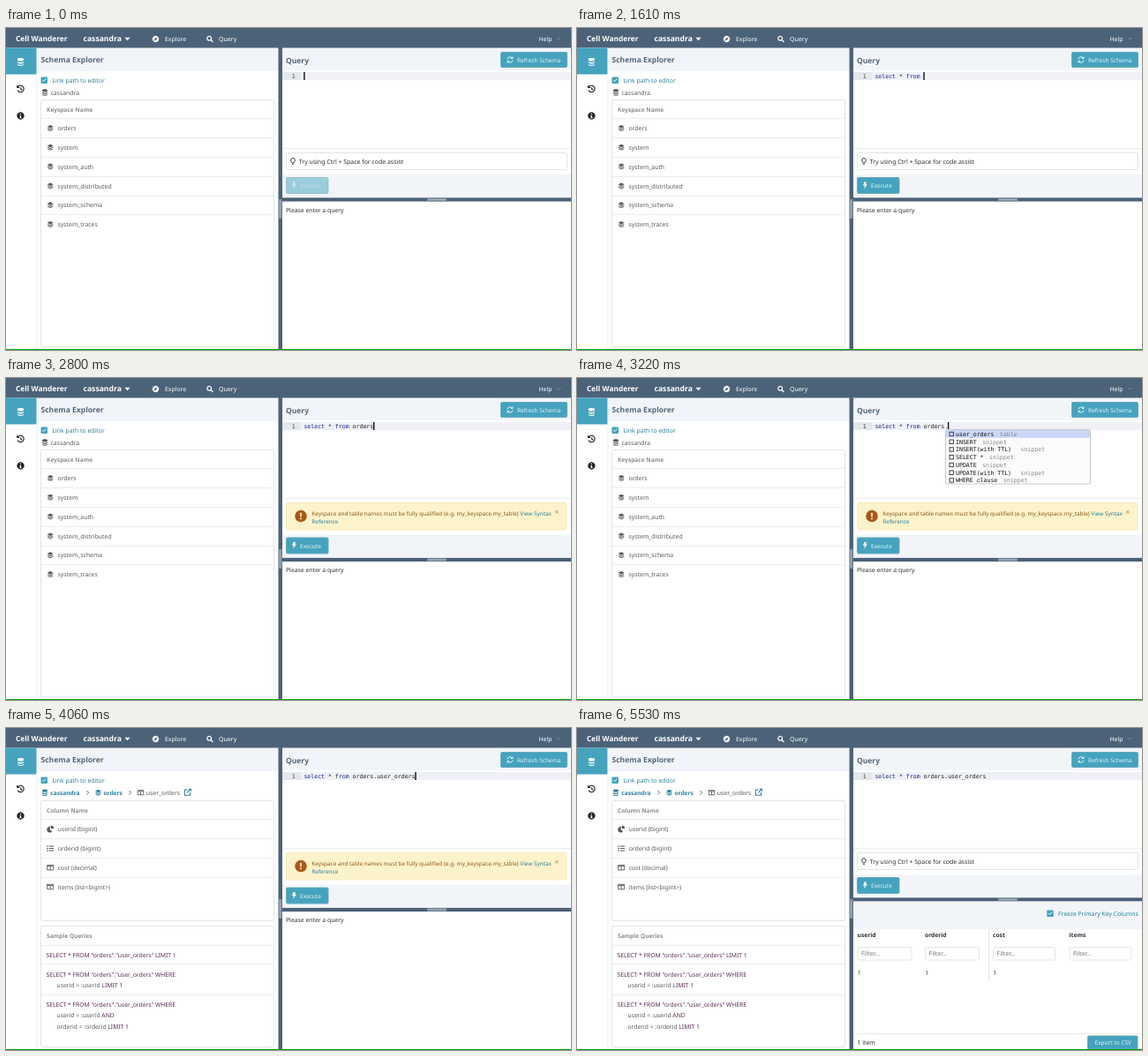
An HTML page with a canvas that plays this animation: 640x365 px, repeating every 5670 ms.

```html
<!DOCTYPE html>
<html lang="en">
<head>
<meta charset="utf-8">
<title>Schema browser</title>
<style>
html, body { margin: 0; width: 100%; height: 100%; overflow: hidden; background: #fff; }
canvas { display: block; }
</style>
</head>
<body>
<canvas id="stage" width="640" height="365"></canvas>
<script>
const ctx = document.getElementById('stage').getContext('2d');
const LOOP = 5670;
const SANS = '"Noto Sans", "Open Sans", sans-serif';
const MONO = '"DejaVu Sans Mono", monospace';
const SLATE = '#4c6278', TEAL = '#45a3be', LINK = '#2b809e', PALE = '#f1f5fa';
const INK = '#2e3136', GREY = '#56595d', MUTED = '#8a8d91', SQL = '#5a2a55', AMBER = '#8f5a18';
const RULE = '#ebedef', BORDER = '#e2e4e7', GRIP = '#8191a1', GRIP_LINE = '#a3b0bc';

const QUERY = 'select * from orders.user_orders';
const KEY_TIMES = [140, 210, 350, 420, 560, 630, 700, 980, 1190, 1330, 1400, 1470,
  1610, 1610, 1820, 1960, 2100, 2240, 2380, 2520, 3150];
const CHAR = 3.94, CODE_X = 337.4;

// Icons live in a 16 x 16 box.
const FILLED = {
  db: 'M2 3a6 2.4 0 0 1 12 0v1.4a6 2.4 0 0 1-12 0zM2 6.6a6 2.4 0 0 0 12 0v2.4a6 2.4 0 0 1-12 0zM2 11.2a6 2.4 0 0 0 12 0v2a6 2.4 0 0 1-12 0z',
  layers: 'M8 1l7 3.5-7 3.5-7-3.5zM1 8l2-1 5 2.5 5-2.5 2 1-7 3.5zM1 11.5l2-1 5 2.5 5-2.5 2 1-7 3.5z',
  info: 'M8 1a7 7 0 1 0 .01 0zM7 3.5h2v2h-2zM6 7h3v4h1v1.5h-4v-1.5h1v-2.5h-1z',
  compass: 'M8 1a7 7 0 1 0 .01 0zM12 4l-2.5 5.5-5.5 2.5 2.5-5.5z',
  alert: 'M8 0a8 8 0 1 0 .01 0zM7 3.5h2v5.5h-2zM7 10.5h2v2h-2z',
  caret: 'M1 4h14l-7 8z',
  bolt: 'M7 0h5l-2 5h4l-8 11 2-8h-4z',
  pie: 'M7 2v7l5 5a7 7 0 1 1-5-12zM9 0a7 7 0 0 1 7 7h-7z',
  list: 'M0 2h3v2.5h-3zM5 2h11v2h-11zM0 7h3v2.5h-3zM5 7h11v2h-11zM0 12h3v2.5h-3zM5 12h11v2h-11z'
};
const STROKED = {
  history: 'M3 4.5a6 6 0 1 1-.5 6M2 1.5v4h4M8.5 5v3.5l2.5 1.5',
  search: 'M6.5 2a4.5 4.5 0 1 0 .01 0zM10 10l4.5 4.5',
  down: 'M2 5l6 6 6-6',
  right: 'M5 2l6 6-6 6',
  refresh: 'M2 7a6 6 0 0 1 11-2.5M14 1v4h-4M14 9a6 6 0 0 1-11 2.5M2 15v-4h4',
  bulb: 'M6 11c0-2-2.5-3-2.5-5.5a4.5 4.5 0 0 1 9 0c0 2.5-2.5 3.5-2.5 5.5zM6.5 14h3',
  table: 'M1 2.5h14v11h-14zM1 5h14M8 5v8.5',
  external: 'M8 3h-6v11h11v-6M10 1.5h4.5v4.5M14 2l-7 7',
  check: 'M3.5 8l3 3 6-6.5',
  close: 'M3 3l10 10M13 3l-10 10'
};

function rect(x, y, w, h, color) {
  ctx.fillStyle = color;
  ctx.fillRect(x, y, w, h);
}

function box(x, y, w, h, fill, border, radius = 1) {
  ctx.beginPath();
  ctx.roundRect(x, y, w, h, radius);
  ctx.fillStyle = fill;
  ctx.fill();
  if (border) { ctx.strokeStyle = border; ctx.lineWidth = 1; ctx.stroke(); }
}

// y is the middle of the capitals.
function text(str, x, y, color = GREY, size = 6.85, weight = 400, family = SANS) {
  ctx.font = `${weight} ${size}px ${family}`;
  ctx.fillStyle = color;
  ctx.fillText(str, x, y + size * 0.38);
}
const bold = (str, x, y, color, size = 6.6) => text(str, x, y, color, size, 600);
const code = (str, x, y, color) => text(str, x, y, color, 6.55, 400, MONO);

function icon(name, cx, cy, size, color, weight = 1.8) {
  ctx.save();
  ctx.translate(cx - size / 2, cy - size / 2);
  ctx.scale(size / 16, size / 16);
  if (FILLED[name]) {
    ctx.fillStyle = color;
    ctx.fill(new Path2D(FILLED[name]), 'evenodd');
  } else {
    ctx.strokeStyle = color;
    ctx.lineWidth = weight;
    ctx.stroke(new Path2D(STROKED[name]));
  }
  ctx.restore();
}

function checkbox(x, y) {
  box(x, y, 7.5, 7.5, TEAL);
  icon('check', x + 3.75, y + 3.75, 7, '#fff', 2.2);
}

function button(x, y, w, h, label, labelX, glyph, glyphX) {
  box(x + .5, y + .5, w - 1, h - 1, TEAL, '#66a9bb', 1.5);
  if (glyph) icon(glyph, glyphX, y + h / 2, 8, '#fff');
  text(label, labelX, y + h / 2 + .3, '#e6f3f7', 6.55);
}

function listBox(y, bottom, title, rules) {
  box(39.5, y + .5, 264, bottom - y, '#fff', BORDER);
  bold(title, 46, y + 11.2, MUTED);
  for (const ry of rules) rect(40, ry, 263, 1, RULE);
}

function drawFrame() {
  rect(0, 0, 640, 365, '#fff');
  rect(35, 22, 274, 27, PALE);
  rect(313, 22, 327, 26, PALE);
  rect(0, 0, 640, 22.5, SLATE);
  bold('Cell Wanderer', 11, 12, '#fff', 8.35);
  bold('cassandra', 87.5, 12, '#fff', 8.6);
  icon('caret', 137.5, 12.5, 7, '#fff');
  icon('compass', 169.5, 12.5, 8.5, '#fff');
  text('Explore', 180, 12, '#fff');
  icon('search', 231, 12.5, 8.5, '#fff', 2.4);
  text('Query', 241, 12, '#fff', 7);
  text('Help', 603.5, 12, '#fff');
  icon('down', 626.5, 12, 5, '#a9b7c4');

  rect(34.5, 53, 1, 311, RULE);
  rect(0, 22.5, 34.5, 30, TEAL);
  icon('db', 16.5, 38.5, 9.5, '#fff');
  icon('history', 16.5, 69, 10, '#222');
  icon('info', 16.5, 99.5, 9.5, '#222');

  bold('Schema Explorer', 39.5, 36, '#56687a', 8.55);
  checkbox(39.5, 55.5);
  text('Link path to editor', 52.5, 59.2, LINK);
}

function drawKeyspaces() {
  icon('db', 44, 73, 8, GREY);
  text('cassandra', 50.5, 73);
  const names = ['orders', 'system', 'system_auth', 'system_distributed', 'system_schema', 'system_traces'];
  listBox(81, 361, 'Keyspace Name', names.map((_, i) => Math.round(102.4 + i * 21.8)));
  names.forEach((name, i) => {
    const y = 113.5 + i * 21.8;
    icon('layers', 50.2, y, 8, GREY);
    text(name, 58.5, y);
  });
}

function drawTableDetails() {
  icon('db', 44, 73.2, 8, LINK);
  bold('cassandra', 50.3, 73.2, LINK);
  icon('right', 92.5, 73.2, 6, GREY, 2.4);
  icon('layers', 104.5, 73.2, 8, LINK);
  bold('orders', 110.5, 73.2, LINK);
  icon('right', 140.5, 73.2, 6, GREY, 2.4);
  icon('table', 152.5, 73.2, 7.5, GREY);
  text('user_orders', 158.8, 73.2);
  icon('external', 205.7, 72.8, 9, LINK);

  const columns = [['pie', 'userid (bigint)'], ['list', 'orderid (bigint)'],
    ['table', 'cost (decimal)'], ['table', 'items (list<bigint>)']];
  listBox(82, 218, 'Column Name', columns.map((_, i) => Math.round(103.4 + i * 21.8)));
  columns.forEach(([glyph, label], i) => {
    const y = 114.6 + i * 21.8;
    icon(glyph, 50.2, y, 8, GREY);
    text(label, 58.7, y);
  });

  listBox(224, 361, 'Sample Queries', [246, 267, 302]);
  const select = 'SELECT * FROM "orders"."user_orders" ';
  const sql = (str, x, y, color = SQL) => {
    text(str, x, y, color, 6.78);
    return x + ctx.measureText(str).width;
  };
  sql(select + 'LIMIT 1', 45.5, 257);
  sql(select + 'WHERE', 45.5, 279);
  sql('LIMIT 1', sql('userid = :userid ', 57.5, 291.5, GREY), 291.5);
  sql(select + 'WHERE', 45.5, 313);
  sql('AND', sql('userid = :userid ', 57.5, 325.5, GREY), 325.5);
  sql('LIMIT 1', sql('orderid = :orderid ', 57.5, 338, GREY), 338);
}

function drawEditor(t) {
  bold('Query', 317, 36.3, '#56687a', 8.5);
  button(560, 27, 76, 18, 'Refresh Schema', 579, 'refresh', 571);

  rect(313, 50, 21, 9, '#e4e7ec');
  rect(334, 50, 306, 9, '#eff1f6');
  code('1', 323.8, 54.4, '#444');
  const count = t >= 3710 ? QUERY.length : KEY_TIMES.filter(k => k <= t).length;
  const typed = QUERY.slice(0, count);
  const words = [[0, 6, '#20208c'], [7, 8, '#222'], [9, 13, '#20208c'], [14, 32, '#222']];
  for (const [from, to, color] of words) {
    code(typed.slice(from, to), CODE_X + from * CHAR, 54.4, color);
  }
  const cursorOff = t >= 3500 && t < 3710 || t >= 4340 && t < 4830 || t >= 5040;
  if (!cursorOff) rect(CODE_X + count * CHAR - .2, 50, 1.4, 9, '#111');
  rect(313, 136, 327, 1, RULE);
}

function drawRunBar(t, warning) {
  const shift = warning ? 11.5 : 0;
  rect(313, 166 + shift, 327, 27, PALE);
  if (warning) {
    box(317.5, 141.5, 317.5, 30.5, '#fdf3cb', '#f6ebc0', 1.5);
    icon('alert', 334, 156.5, 13.5, '#a8571a');
    const message = 'Keyspace and table names must be fully qualified (e.g. my_keyspace.my_table) ';
    text(message, 346.3, 153.5, AMBER, 6.4);
    text('View Syntax', 346.3 + ctx.measureText(message).width, 153.5, LINK, 6.4);
    text('Reference', 346.3, 162.3, LINK, 6.4);
    icon('close', 623.7, 151.8, 5.5, AMBER);
  } else {
    box(317.5, 141.5, 318, 19, '#fff', BORDER);
    icon('bulb', 325, 151.3, 8.5, '#333');
    text('Try using Ctrl + Space for code assist', 331.8, 151.2, INK, 6.93);
  }
  ctx.globalAlpha = .5 + .5 * Math.min(1, Math.max(0, (t - 140) / 280));
  button(317, 169 + shift, 48.5, 19, 'Execute', 333, 'bolt', 326);
  ctx.globalAlpha = 1;

  rect(313, 192.4 + shift, 327, 4.2, SLATE);
  rect(477, 192.8 + shift, 22, 3.4, GRIP);
  rect(478, 194 + shift, 20, 1, GRIP_LINE);
  return shift;
}

function drawCompletions() {
  box(417.5, 58.5, 164, 61.5, '#fbfbfb', '#c9c9c9');
  rect(418, 59, 163, 8.8, '#cad6fa');
  const items = ['user_orders', 'INSERT', 'INSERT(with TTL) ', 'SELECT *', 'UPDATE', 'UPDATE(with TTL) ', 'WHERE clause'];
  items.forEach((item, i) => {
    const y = 63.5 + i * 8.75;
    ctx.strokeStyle = '#333';
    ctx.lineWidth = .9;
    ctx.strokeRect(422, y - 2.2, 4.4, 4.4);
    code(item, 429, y, '#111');
    code(i ? 'snippet' : 'table', 435.5 + item.length * CHAR, y, '#888');
  });
}

function drawResults() {
  rect(313, 196.6, 327, 32, PALE);
  checkbox(532.3, 206.5);
  text('Freeze Primary Key Columns', 545, 210.3, LINK, 6.8);
  rect(313, 228.6, 327, 60, '#fff');
  const columns = [['userid', 317.5, 61, '1'], ['orderid', 394, 61, '1'], ['cost', 471, 70, '1'], ['items', 557.5, 70, '']];
  for (const [name, x, w, value] of columns) {
    bold(name, x, 234, INK, 6.7);
    box(x + .5, 248.5, w, 14.5, '#fff', BORDER, 2);
    text('Filter...', x + 4.5, 255.8, '#777', 7);
    text(value, x + .3, 277.8, INK);
  }
  rect(466, 228.6, 1, 58, BORDER);
  rect(313, 346, 327, 1, RULE);
  text('1 item', 317.5, 356.5, INK);
  button(578, 348.5, 57.5, 16, 'Export to CSV', 586.5);
}

function draw(t) {
  drawFrame();
  if (t < 3780) drawKeyspaces(); else drawTableDetails();
  drawEditor(t);
  const shift = drawRunBar(t, t >= 2800 && t < 4130);
  if (t < 5180) text('Please enter a query', 317, 206.1 + shift, INK, 6.82);
  else drawResults();
  if (t >= 3220 && t < 3710) drawCompletions();

  rect(308.5, 22, 4.5, 342, SLATE);
  rect(309, 194, 3.5, 22, GRIP);
  rect(310.2, 195, 1, 20, GRIP_LINE);
  rect(0, 364, 640, 1, '#00a000');
}

ctx.textRendering = 'geometricPrecision';
function tick() {
  draw(performance.now() % LOOP);
  requestAnimationFrame(tick);
}
tick();
</script>
</body>
</html>
```
